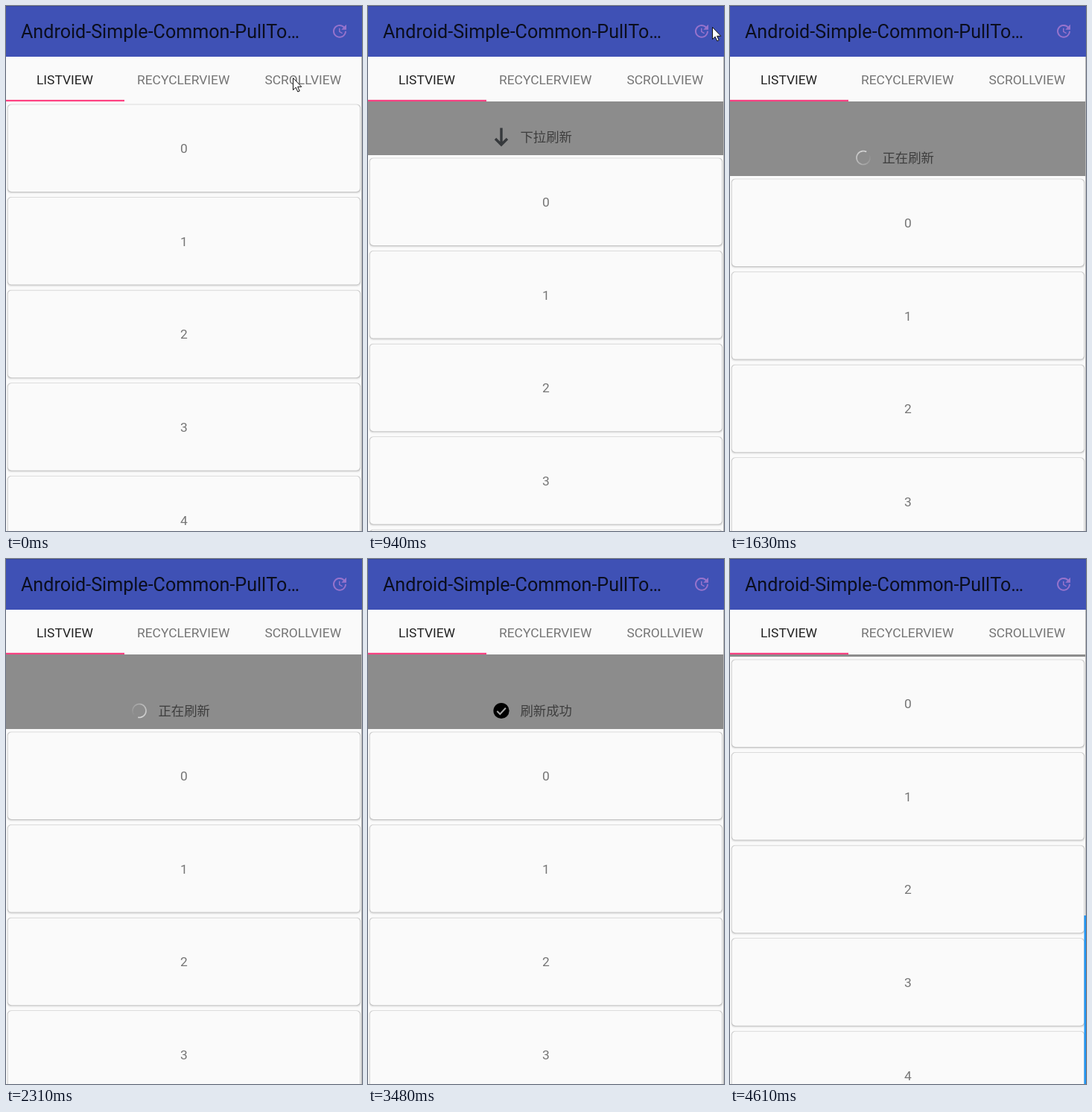
Write an HTML page that moves like this. It is 478 by 704 pixels and loops after 4.71 s.

```html
<!DOCTYPE html>
<html lang="en">
<head>
<meta charset="utf-8">
<title>Pull to refresh</title>
<style>
  html, body { margin: 0; width: 100%; height: 100%; overflow: hidden; background: #fafafa; }
  svg { display: block; width: 478px; height: 704px; }
  text { font-family: Roboto, "Noto Sans", sans-serif; font-size: 17.4px; fill: #757575; }
  .mid { text-anchor: middle; }
  #title { font-size: 25.1px; fill: #0b0e1e; }
  #status { font-family: "Noto Sans CJK SC", "Noto Sans CJK", sans-serif; fill: #3e3e3e; }
</style>
</head>
<body>
<svg id="stage" viewBox="0 0 478 704">
  <rect y="128" width="477" height="576" fill="#8c8c8c"/>
  <g id="header">
    <path id="arrow" d="M179 191.5V214M171 206l8 8 8-8" fill="none" stroke="#36393c" stroke-width="3.4"/>
    <g id="spinner" fill="none" stroke="#e2e2e2" stroke-width="1.7"></g>
    <g id="check">
      <circle cx="179" cy="203.5" r="10.6"/>
      <path d="M173.3 204l4 4 7.6-8.3" fill="none" stroke="#a4a4a4" stroke-width="2"/>
    </g>
    <text id="status" x="204.4" y="210.3"></text>
  </g>
  <g id="list">
    <rect y="128" width="478" height="576" fill="#fafafa"/>
  </g>
  <rect x="477" y="68" width="1" height="636" fill="#b4b4b4"/>
  <rect id="edge" x="475.5" y="478" width="2.5" height="226" fill="#2196f3"/>

  <rect width="478" height="68" fill="#3f51b5"/>
  <rect width="478" height="1" fill="#36469f"/>
  <text id="title" x="20" y="43">Android-Simple-Common-PullTo…</text>
  <path transform="translate(436 21.7)" fill="#9673cc" d="M21 10.12h-6.78l2.74-2.82c-2.73-2.7-7.15-2.8-9.88-.1-2.73 2.71-2.73 7.08 0 9.79 2.73 2.71 7.15 2.71 9.88 0C18.32 15.65 19 14.08 19 12.1h2c0 1.98-.88 4.55-2.64 6.29-3.51 3.48-9.21 3.48-12.72 0-3.5-3.47-3.53-9.11-.02-12.58 3.51-3.47 9.14-3.47 12.65 0L21 3v7.12zM12.5 8v4.25l3.5 2.08-.72 1.21L11 13V8h1.5z"/>
  <rect y="68" width="477" height="60" fill="#fafafa"/>
  <text class="mid" x="79" y="105" style="fill:#212121">LISTVIEW</text>
  <text class="mid" x="238.2" y="105">RECYCLERVIEW</text>
  <text class="mid" x="398.8" y="105">SCROLLVIEW</text>
  <rect y="125.8" width="159" height="2.2" fill="#ff4081"/>
  <path id="cursor" d="M.5.5V16.6L4.2 13.2L6.8 19L9.2 18L6.7 12.3H11.8Z" fill="#fff" stroke="#111" stroke-width="1"/>
</svg>
<script>
const LOOP = 4710, FULL = 100;
const $ = id => document.getElementById(id);

function add(parent, tag, attrs, text) {
  const node = document.createElementNS('http://www.w3.org/2000/svg', tag);
  for (const key in attrs) node.setAttribute(key, attrs[key]);
  if (text !== undefined) node.textContent = text;
  parent.appendChild(node);
}

for (let i = 0; i < 5; i++) {
  const y = 132 + i * 124.6;
  const layer = (x, dy, h, fill, alpha) => add($('list'), 'rect',
    { x, y: y + dy, width: 477.8 - 2 * x, height: h, rx: 5, fill, 'fill-opacity': alpha });
  layer(1.2, 0, 120, '#000', 0.04);
  layer(1.6, -0.6, 119.4, '#000', 0.07);
  layer(2, -0.3, 118.2, '#000', 0.12);
  layer(2.6, 0.2, 116.8, '#fafafa', 1);
  add($('list'), 'text', { class: 'mid', x: 238.8, y: y + 65.2 }, i);
}

// Ring that fades out behind its leading end
const SEGMENTS = 30;
for (let i = 0; i < SEGMENTS; i++) {
  const point = k => {
    const a = -k / SEGMENTS * 2 * Math.PI;
    return `${9 * Math.cos(a)} ${9 * Math.sin(a)}`;
  };
  add($('spinner'), 'path', {
    d: `M${point(i)}A9 9 0 0 0 ${point(i + 1)}`,
    'stroke-opacity': Math.max(0, 1 - i / (SEGMENTS - 3))
  });
}

// Steps are [start time, ...values]; the last one reached holds
const pull = [[0, 0], [790, 25.5], [940, 72], [1070, 91], [1210, 98.5], [1360, FULL],
  [4370, 30], [4490, 11], [4610, 3]];
const pointer = [[0, 385, 96], [150, 402, 81], [270, 423, 62], [390, 445, 43],
  [510, 462, 28], [1210, 454, 57]];
const spinTicks = [1360, 1480, 1630, 1750, 1900, 2030, 2180, 2310, 2450, 2570,
  2800, 2940, 3090, 3240, 3360].map(t => [t]);
const modes = [[0, 'arrow', '下拉刷新'], [1360, 'spinner', '正在刷新'],
  [3480, 'check', '刷新成功'], [4370, 'arrow', '下拉刷新']];

const at = (steps, t) => steps.reduce((held, step) => step[0] <= t ? step : held);
const show = (id, on) => $(id).setAttribute('visibility', on ? 'visible' : 'hidden');
const move = (id, x, y) => $(id).setAttribute('transform', `translate(${x} ${y})`);

function draw(t) {
  const [, offset] = at(pull, t);
  move('list', 0, offset);
  move('header', 0, offset - FULL);

  const [, mode, label] = at(modes, t);
  for (const id of ['arrow', 'spinner', 'check']) show(id, id === mode);
  if ($('status').textContent !== label) $('status').textContent = label;

  const angle = 100 + (at(spinTicks, t)[0] - 2310) * 360 / 1500;
  $('spinner').setAttribute('transform', `translate(179 203.5) rotate(${angle})`);

  const [, x, y] = at(pointer, t);
  move('cursor', x, y);
  show('cursor', t < 1360);
  show('edge', t >= 4610);
}

const start = performance.now();
function tick() {
  draw((performance.now() - start) % LOOP);
  requestAnimationFrame(tick);
}
tick();
</script>
</body>
</html>
```
